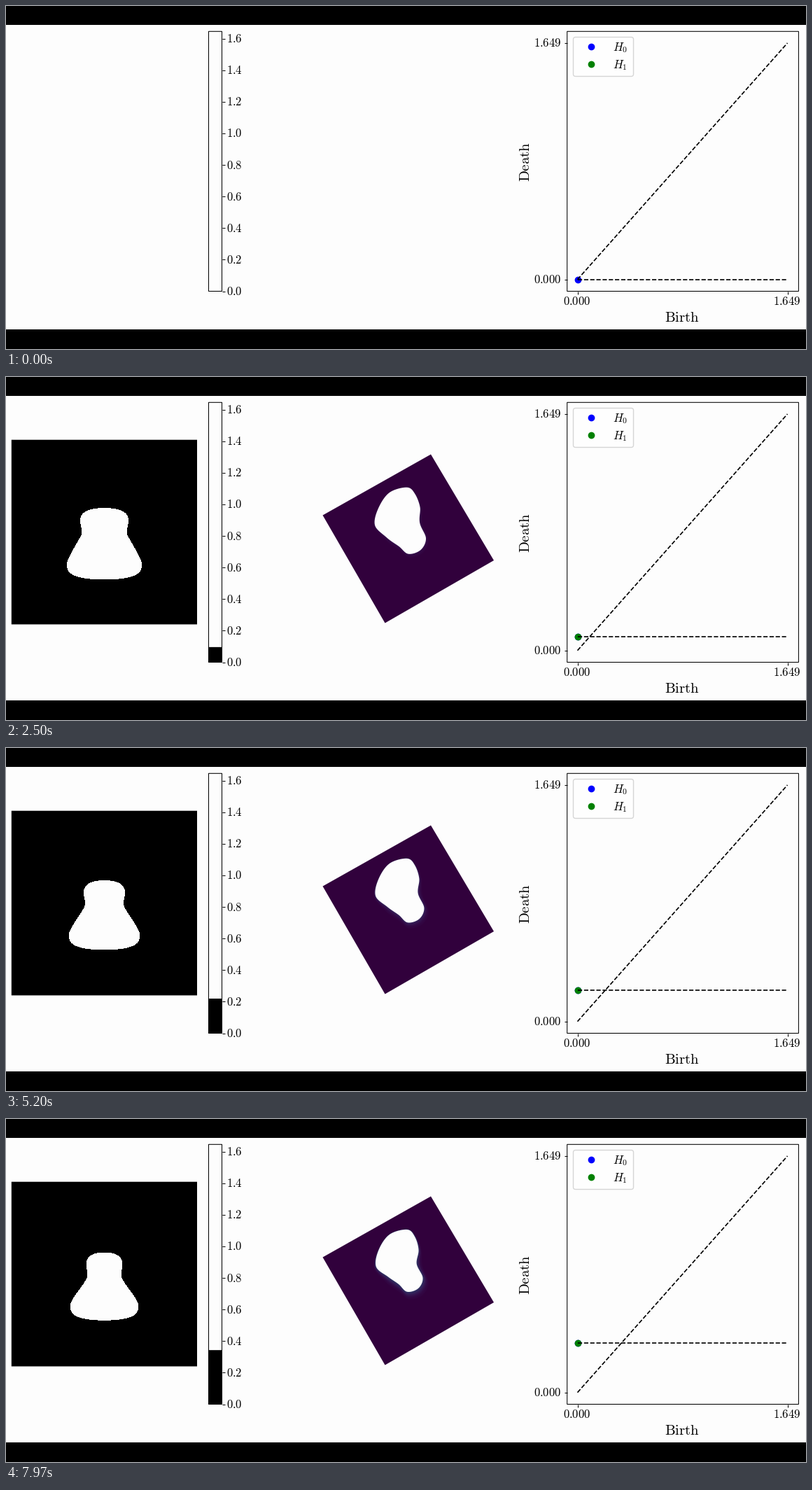
Recreate the animation shown at these times as a matplotlib script. Size 1143 by 490 pixels, loop 8000 ms.

```python
import numpy as np
import matplotlib as mpl
import matplotlib.pyplot as plt
from matplotlib.animation import FuncAnimation
from matplotlib.patches import FancyBboxPatch, Polygon, Rectangle

W, H, DPI = 1143, 490, 100
LOOP, FRAMES = 8000, 250
STEP = 312.5                # ms per threshold step
LEVELS, LAST = 120, 25      # steps to full range, last step in the loop
PAPER = "#fdfdfd"

mpl.rcParams["mathtext.fontset"] = "cm"

# Key points of the hole at the last step, clockwise from the top
HOLE = np.array([(573, 158), (584, 168), (589.5, 187), (586.7, 207),
                 (595.5, 227), (589, 242), (573, 246.8), (561, 236),
                 (546, 225.5), (528.8, 211), (532.5, 187), (548, 165)])
HOLE_MID = np.array([560, 200])


def ease(x):
    x = np.clip(x, 0, 1)
    return x * x * (3 - 2 * x)


def spread(k):
    """Extra size of the openings: 1 at the first step, 0 at the last."""
    return 1 - (max(k - 1, 0) / (LAST - 1)) ** 0.555


def bell(k):
    """Neck and base joined by an easing, capped by a superellipse."""
    u = -np.cos(np.linspace(0, np.pi, 90))
    y = 239.1 + 48.1 * u
    half = 26 + 22.8 * ease((y - 224) / 46)
    half -= 2.5 * np.exp(-((y - 222) / 10) ** 2)
    half *= np.sqrt(1 - u**8)
    e = spread(k)
    half *= 1 + e * (0.64 - 0.45 * ease((y - 220) / 42))
    y = 255 + (1 + 0.1 * e) * (y - 255)
    x = np.r_[140.5 + half, 140.5 - half[::-1]]
    return np.c_[x, np.r_[y, y[::-1]]]


def smooth(p, n=10):
    """Closed Catmull-Rom curve through p."""
    a, c, d = (np.roll(p, s, axis=0)[:, None] for s in (1, -1, -2))
    b = p[:, None]
    t = np.linspace(0, 1, n, endpoint=False)[None, :, None]
    q = 2 * b + (c - a) * t + (2 * a - 5 * b + 4 * c - d) * t**2
    q = q + (3 * b - a - 3 * c + d) * t**3
    return (q / 2).reshape(-1, 2)


def hole(k):
    """The last outline, pushed outwards mostly to the lower right."""
    p = smooth(HOLE)
    x, y = (p - HOLE_MID).T
    ang = np.arctan2(y, x)
    push = 11.5 * ((1 + np.cos(ang - np.radians(65))) / 2) ** 1.5
    return p + spread(k) * push[:, None] * np.c_[np.cos(ang), np.sin(ang)]


def shade(k):
    return tuple(0.72 * c for c in mpl.colormaps["viridis"](k / LEVELS)[:3])


fig = plt.figure(figsize=(W / DPI, H / DPI), dpi=DPI, facecolor="black")
ax = fig.add_axes([0, 0, 1, 1])
ax.set_xlim(0, W)
ax.set_ylim(H, 0)
ax.axis("off")


def add(patch, z):
    patch.set_zorder(z)
    return ax.add_patch(patch)


def box(x0, y0, x1, y1, z, **kw):
    return add(Rectangle((x0, y0), x1 - x0, y1 - y0, snap=False, **kw), z)


def blob(points, color, z, **kw):
    return add(Polygon(points, fc=color, lw=0, **kw), z)


def frame(x0, y0, x1, y1):
    box(x0, y0, x1, y1, 6, fc="none", ec="black", lw=0.75)


def line(xs, ys, z=6, lw=0.75, ls="-"):
    return ax.plot(xs, ys, color="black", lw=lw, ls=ls, zorder=z,
                   solid_capstyle="butt")[0]


def label(x, y, s, size=12, ha="center", rot=0):
    ax.text(x, y, s, fontsize=size, ha=ha, va="baseline", rotation=rot,
            rotation_mode="anchor", zorder=8)


def roman(s):
    return r"$\mathrm{%s}$" % s


def dot(x, y, color, z):
    return ax.plot([x], [y], "o", color=color, ms=6, zorder=z)[0]


box(0, 27, W, 462, 0, fc=PAPER, lw=0)

# Thresholded image
square = box(7.8, 89.7, 273, 353.4, 1, fc="black", lw=0)
bell_patch = blob(bell(1), PAPER, 2, antialiased=False)

# Tilted sheet, with one coloured band per threshold step
sheet = blob([(607, 110.5), (697, 262), (541.5, 351.5), (452.5, 197.5)],
             shade(0), 1)
bands = [blob(hole(j), shade(j + 1), 2 + j / 100) for j in range(1, LAST + 1)]
hole_patch = blob(hole(1), PAPER, 3)

# Colour bar
BAR_L, BAR_R, BAR_T, BAR_B = 289.5, 308.5, 36.3, 407.5
fill = box(BAR_L, BAR_B, BAR_R, BAR_B, 1, fc="black", lw=0)
frame(BAR_L, BAR_T, BAR_R, BAR_B)
for v in np.arange(0, 1.7, 0.2):
    y = BAR_B - 225.6 * v
    line([BAR_R, BAR_R + 4], [y, y])
    label(315, y + 5.5, roman(f"{v:.1f}"), ha="left")

# Persistence diagram
X0, X1, Y0, Y1 = 816.5, 1116.5, 390.7, 52.9
AX_L, AX_R = 801.7, 1132.4
frame(AX_L, BAR_T, AX_R, BAR_B)
for s, x, y in (("0.000", X0, Y0), ("1.649", X1, Y1)):
    line([x, x], [BAR_B, BAR_B + 4])
    line([AX_L - 4, AX_L], [y, y])
    label(x - 0.5, 427, roman(s))
    label(793.5, y + 5.5, roman(s), ha="right")
label(965.5, 450.5, roman("Birth"), 15)
label(747.5, 222.5, roman("Death"), 15, rot=90)
line([X0, X1], [Y0, Y1], 5, 1.2, "--")
level = line([X0, X1], [Y0, Y0], 5, 1.2, "--")
h0 = dot(X0, Y0, "blue", 4)
h1 = dot(X0, Y0, "green", 4.1)

# Legend
add(FancyBboxPatch((813.8, 47.8), 79.4, 49.4, fc="white", ec="#cccccc",
                   alpha=0.8, lw=1,
                   boxstyle="round,pad=3.3,rounding_size=3.3"), 6)
for n, color in enumerate(("blue", "green")):
    y = 58 + 25 * n
    dot(836, y, color, 7)
    label(867, y + 6, f"$H_{n}$", ha="left")


def draw(i):
    k = int(i * (LOOP / FRAMES) / STEP)
    for art in (square, bell_patch, sheet, hole_patch, h1):
        art.set_visible(k > 0)
    bell_patch.set_xy(bell(k))
    hole_patch.set_xy(hole(k))
    for j, band in enumerate(bands, 1):
        band.set_visible(j < k)
    part = k / LEVELS
    top = (BAR_B - BAR_T) * part
    fill.set_y(BAR_B - top)
    fill.set_height(top)
    y = Y0 + (Y1 - Y0) * part
    level.set_ydata([y, y])
    for d in (h0, h1):
        d.set_ydata([y])
    return []


anim = FuncAnimation(fig, draw, frames=FRAMES, interval=LOOP // FRAMES,
                     repeat=True, repeat_delay=0, blit=False)
plt.show()
```
